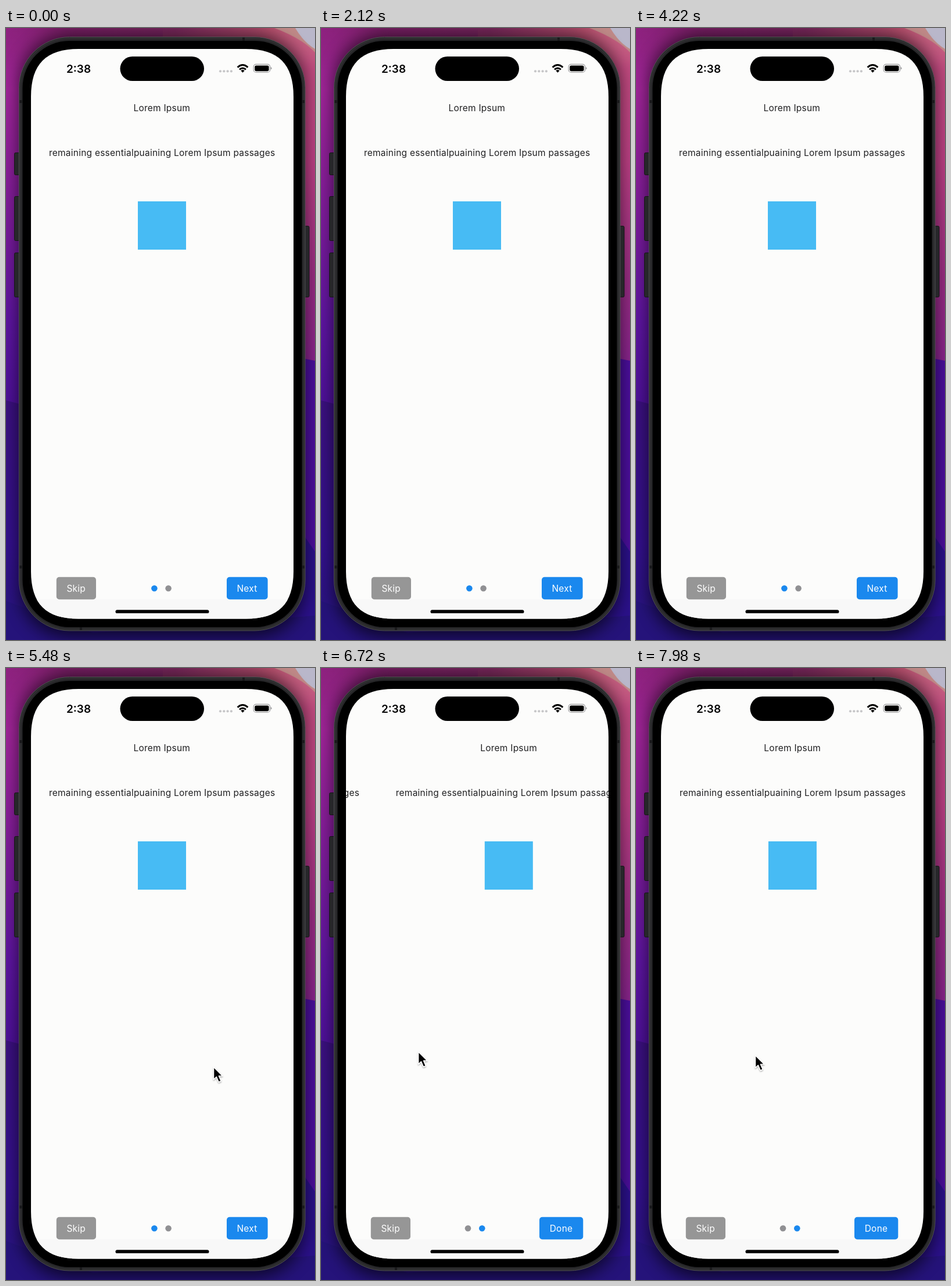
Recreate the animation shown at these times as an HTML page. Size 532 by 1052 pixels, loop 8 s.

```html
<!DOCTYPE html>
<html lang="en">
<head>
<meta charset="utf-8">
<title>Onboarding pager</title>
<style>
html, body { margin: 0; width: 100%; height: 100%; overflow: hidden; background: #2a1070; }
svg { display: block; width: 532px; height: 1052px; }
text { font-family: Inter, "Open Sans", sans-serif; font-size: 15.5px; letter-spacing: .235px; text-anchor: middle; fill: #202022; }
.clock { font-size: 19px; font-weight: 600; letter-spacing: 0; fill: #000; }
.label { fill: #fff; }
</style>
</head>
<body>
<svg viewBox="0 0 532 1052">
  <defs>
    <linearGradient id="left" x1="0" y1="0" x2="0" y2="1">
      <stop offset="0" stop-color="#8e2280"/>
      <stop offset=".1" stop-color="#a02598"/>
      <stop offset=".22" stop-color="#8c1f98"/>
      <stop offset=".34" stop-color="#761a9a"/>
      <stop offset=".48" stop-color="#5d15a0"/>
      <stop offset=".62" stop-color="#4c1098"/>
      <stop offset="1" stop-color="#381088"/>
    </linearGradient>
    <linearGradient id="right" x1="0" y1="0" x2="0" y2="1">
      <stop offset="0" stop-color="#c4507e"/>
      <stop offset=".4" stop-color="#bc4084"/>
      <stop offset=".75" stop-color="#982d82"/>
      <stop offset="1" stop-color="#88248c"/>
    </linearGradient>
    <linearGradient id="top" x1="0" y1="0" x2="1" y2="0">
      <stop offset="0" stop-color="#8e2280"/>
      <stop offset=".2" stop-color="#7d2068"/>
      <stop offset=".55" stop-color="#7c2860"/>
      <stop offset=".85" stop-color="#b8506e"/>
      <stop offset="1" stop-color="#c86f86"/>
    </linearGradient>
    <linearGradient id="low" x1="0" y1="0" x2="0" y2="1">
      <stop offset="0" stop-color="#3b107f"/>
      <stop offset=".6" stop-color="#33108c"/>
      <stop offset="1" stop-color="#25157a"/>
    </linearGradient>
    <linearGradient id="fade" x1="0" y1="0" x2="0" y2="1">
      <stop offset="0" stop-color="#fff" stop-opacity="1"/>
      <stop offset="1" stop-color="#fff" stop-opacity="0"/>
    </linearGradient>
    <mask id="topFade"><rect width="532" height="70" fill="url(#fade)"/></mask>
    <filter id="blur" x="-20%" y="-20%" width="140%" height="140%"><feGaussianBlur stdDeviation="15"/></filter>
    <filter id="soft" x="-50%" y="-50%" width="200%" height="200%"><feDropShadow dx="0" dy="1.5" stdDeviation="1.3" flood-opacity=".35"/></filter>
    <path id="glass" d="M125 36H413C469 36 495 62 495 118V934C495 990 469 1015.500 413 1015.500H125C69 1015.500 43 990 43 934V118C43 62 69 36 125 36Z"/>
    <clipPath id="view"><use href="#glass"/></clipPath>
    <g id="page">
      <text x="268.300" y="143">Lorem Ipsum</text>
      <text x="268.700" y="220">remaining essentialpuaining Lorem Ipsum passages</text>
      <rect x="227" y="298" width="83" height="83" fill="#47bbf4"/>
    </g>
  </defs>

  <rect width="532" height="1052" fill="url(#left)"/>
  <rect x="270" width="262" height="574" fill="url(#right)"/>
  <rect width="532" height="70" fill="url(#top)" mask="url(#topFade)"/>
  <path d="M462 0H532V42Q510 18 462 0Z" fill="#c08a88"/>
  <path d="M498 0H532V36Q512 24 498 0Z" fill="#b9b7ca"/>
  <path d="M270 520L532 572V900H270Z" fill="#4b0f9c"/>
  <path d="M0 640L60 656V1052H0Z" fill="url(#low)"/>
  <path d="M40 960L510 868L532 900V1052H40Z" fill="#2b118a"/>
  <path d="M0 985L150 1040L532 1010V1052H0Z" fill="#25137a"/>

  <rect x="24" y="12" width="489" height="1034" rx="84" opacity=".68" filter="url(#blur)"/>

  <g fill="#27272a" stroke="#151517">
    <rect x="14.500" y="214.500" width="10" height="38" rx="2"/>
    <rect x="14.500" y="289.500" width="10" height="76" rx="2"/>
    <rect x="14.500" y="386.500" width="10" height="76" rx="2"/>
    <rect x="512" y="340.500" width="10" height="122" rx="2"/>
  </g>
  <rect x="22.500" y="15.500" width="492.500" height="1020.500" rx="87" fill="#262628" stroke="#525254"/>
  <rect x="25" y="18" width="487.500" height="1015.500" rx="84.500" fill="none" stroke="#303032" stroke-width="2"/>
  <path d="M407 16h4v6h-4zM127 1030h4v5h-4zM23 124h5v5h-5zM23 924h5v5h-5zM510 124h4v5h-4zM510 924h4v5h-4z" fill="#1a1a1c"/>
  <rect x="28.500" y="22" width="481" height="1008" rx="81"/>
  <use href="#glass" fill="#fcfcfb"/>

  <g clip-path="url(#view)">
    <rect x="42" y="982" width="454" height="35" fill="#f8f8f8"/>
    <g id="pages">
      <use href="#page"/>
      <use href="#page" x="452"/>
    </g>
  </g>

  <text class="clock" x="125" y="76.500">2:38</text>
  <rect x="196.500" y="49" width="144.500" height="42" rx="21"/>
  <g fill="#c6c6c8">
    <circle cx="369" cy="74.300" r="2.100"/><circle cx="375.300" cy="74.300" r="2.100"/>
    <circle cx="381.600" cy="74.300" r="2.100"/><circle cx="387.900" cy="74.300" r="2.100"/>
  </g>
  <g fill="none" stroke="#000" stroke-width="2.900">
    <path d="M398.600 67.600Q407.500 59.600 416.400 67.600M402 71.300Q407.500 66.500 413 71.300"/>
  </g>
  <path d="M404.300 73.300Q407.500 70.700 410.700 73.300L407.500 76.700Z"/>
  <rect x="426.200" y="62.400" width="28.400" height="13.800" rx="4.300" fill="none" stroke="#9b9b9d" stroke-width="1.200"/>
  <rect x="428.200" y="64.400" width="24.400" height="9.800" rx="2.700"/>
  <path d="M455.800 67V71.600Q457.600 71 457.600 69.300T455.800 67Z" fill="#9b9b9d"/>

  <g id="skip">
    <rect x="86.800" y="943.800" width="68.200" height="38.400" rx="5" fill="#969696"/>
    <text class="label" x="120.700" y="968.500">Skip</text>
  </g>
  <circle id="dotA" cy="963.200" r="5.300"/>
  <circle id="dotB" cy="963.200" r="5.300"/>
  <rect id="go" y="943.800" height="38.400" rx="5" fill="#1a88ee"/>
  <text id="goText" class="label" y="968.500"></text>
  <rect x="188.500" y="1000.200" width="161" height="5.900" rx="2.950"/>

  <path id="cursor" d="M0 0V21.200L4.800 16.700L8.700 25.700L12.700 24L8.900 15.200H15.300Z" stroke="#fff" stroke-width="1.500" stroke-linejoin="round" filter="url(#soft)"/>
</svg>
<script>
const LOOP = 8000, PAGE = 452, RELEASE = 133, ARRIVE = 137;
const $ = id => document.getElementById(id);
const set = (id, attrs) => { for (const k in attrs) $(id).setAttribute(k, attrs[k]); };

// Steps are shown in threes, lasting 20, 20 and 100 ms.
function stepAt(ms) {
  const u = ms + 20, r = u % 140;
  return 3 * Math.floor(u / 140) + (r < 20 ? 0 : r < 40 ? 1 : 2);
}

// Rows are [step, ...values].
function lerp(rows, s) {
  const j = Math.min(rows.length - 1, Math.max(1, rows.findIndex(r => r[0] >= s)));
  const a = rows[j - 1], b = rows[j];
  const k = Math.min(1, Math.max(0, (s - a[0]) / (b[0] - a[0])));
  return a.slice(1).map((v, i) => v + (b[i + 1] - v) * k);
}

const visits = [
  [[22, 536, 672], [27, 508, 676], [30, 508, 677], [35, 536, 682]],
  [[102, 536, 680], [108, 440, 684], [114, 372, 686], [119, 357.5, 686], [123, 352, 685],
   [128, 302, 678], [133, 212, 666], [137, 128, 656], [140, 116, 654], [146, 178, 661],
   [153, 219.5, 666], [162, 212, 666], [172, 205.5, 666]]
];
const drag = [[122, 0], [125, 8], [128, 35], [131, 82], [133, 120]];

// After release the page settles along an exponential tail.
function scrollAt(s) {
  return s < RELEASE ? lerp(drag, s)[0] : PAGE - 182 * Math.exp(-.15 * (s - ARRIVE));
}

function draw(ms) {
  const s = stepAt(ms), x = scrollAt(s), last = x > PAGE / 2;
  set("pages", { transform: `translate(${-x} 0)` });
  set("skip", { transform: `translate(${last ? -1 : 0} 0)` });
  set("dotA", { cx: last ? 253 : 255.4, fill: last ? "#909093" : "#1a88ee" });
  set("dotB", { cx: last ? 277.3 : 279.6, fill: last ? "#1a88ee" : "#909093" });
  set("go", { x: last ? 376 : 380, width: last ? 75.3 : 70.6 });
  set("goText", { x: last ? 413.5 : 415 });
  $("goText").textContent = last ? "Done" : "Next";

  const visit = visits.find(v => s >= v[0][0] && s <= v[v.length - 1][0]);
  $("cursor").style.display = visit ? "" : "none";
  if (visit) set("cursor", { transform: `translate(${lerp(visit, s).join(" ")})` });
}

const start = performance.now();
function tick() {
  draw((performance.now() - start) % LOOP);
  requestAnimationFrame(tick);
}
tick();
</script>
</body>
</html>
```
